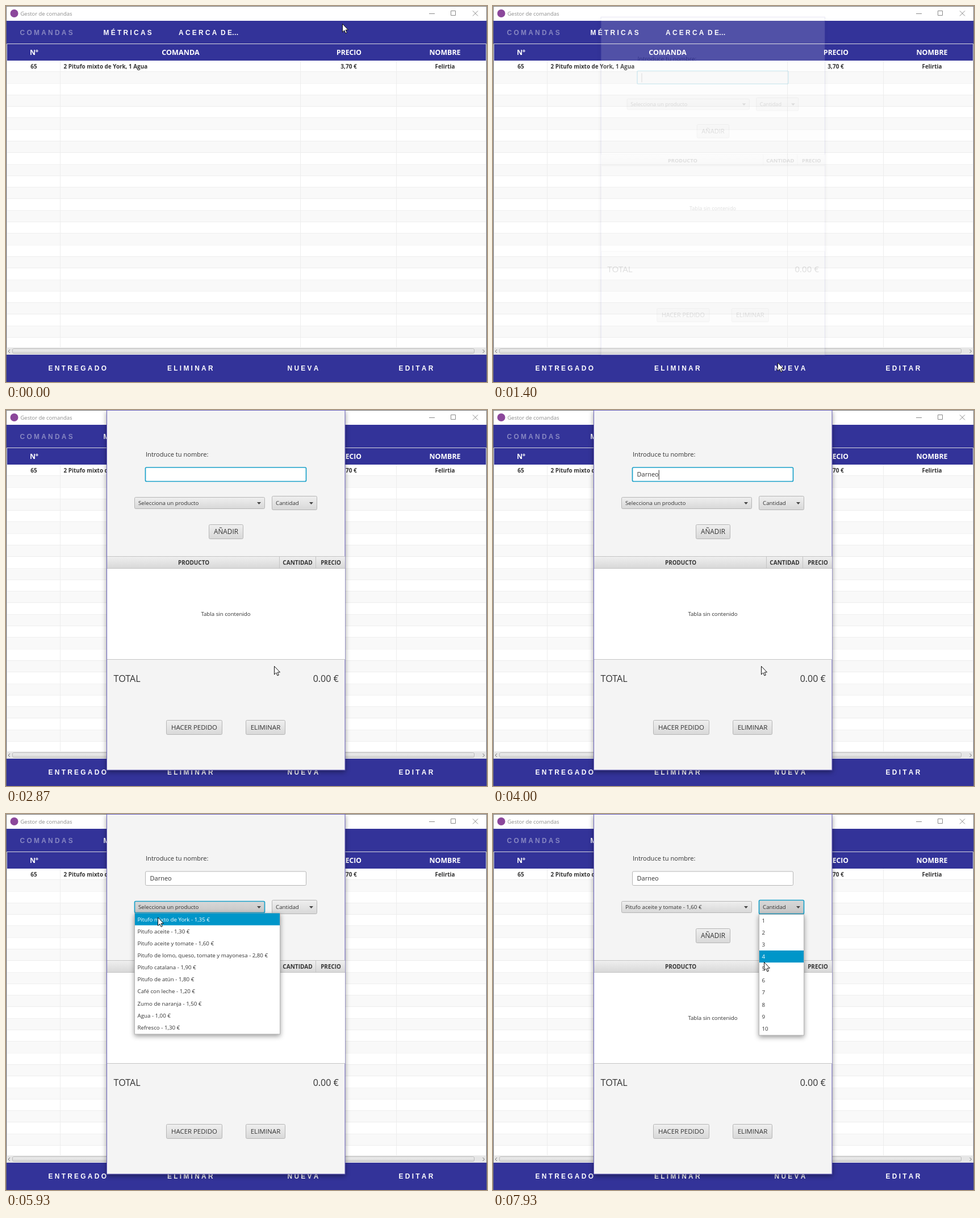
An HTML page for the animation above (8000 ms loop, 847x661 px).

```html
<!DOCTYPE html>
<html lang="es">
<head>
<meta charset="utf-8">
<title>Gestor de comandas</title>
<style>
html, body { margin: 0; width: 100%; height: 100%; overflow: hidden; background: #fff; }
svg { display: block; }
text { font-family: "Open Sans", "Noto Sans", sans-serif; fill: #333; white-space: pre; }
.bar { font: bold 11.9px "Liberation Sans", Arial, sans-serif; fill: #fff; font-kerning: none; }
.bold { font-weight: 700; }
.white { fill: #fff; }
.shadow { filter: drop-shadow(0 3px 4px #0006); }
</style>
</head>
<body>
<svg id="stage" width="847" height="661" viewBox="0 0 847 661">
  <defs>
    <linearGradient id="face" x2="0" y2="1"><stop stop-color="#efefef"/><stop offset="1" stop-color="#d8d8d8"/></linearGradient>
    <linearGradient id="hover" x2="0" y2="1"><stop stop-color="#fafafa"/><stop offset="1" stop-color="#e6e6e6"/></linearGradient>
    <linearGradient id="pressed" x2="0" y2="1"><stop stop-color="#d8d8d8"/><stop offset="1" stop-color="#c6c6c6"/></linearGradient>
  </defs>
</svg>
<script>
const BLUE = '#333399', FOCUS = '#1ba1c9', LINE = '#ededed', ROW = 21.15;
const PRODUCTS = [
  'Pitufo mixto de York - 1,35 €', 'Pitufo aceite - 1,30 €', 'Pitufo aceite y tomate - 1,60 €',
  'Pitufo de lomo, queso, tomate y mayonesa - 2,80 €', 'Pitufo catalana - 1,90 €', 'Pitufo de atún - 1,80 €',
  'Café con leche - 1,20 €', 'Zumo de naranja - 1,50 €', 'Agua - 1,00 €', 'Refresco - 1,30 €'];
const QUANTITIES = Array.from({ length: 10 }, (_, i) => `${i + 1}`);
const NAME = 'Darneo';
const TYPED_AT = [3320, 3520, 3590, 3720, 3860, 3990];
const CARET_OFF = [[1860, 2390], [2860, 2920], [4520, 5025], [5520, 8000]];

const rect = (x, y, w, h, fill, extra = '') =>
  `<rect x="${x}" y="${y}" width="${w}" height="${h}" fill="${fill}" ${extra}/>`;
const path = (d, stroke, extra = '') => `<path d="${d}" fill="none" stroke="${stroke}" ${extra}/>`;
// Text centred vertically on its capitals
const text = (x, y, size, s, cls = '', anchor = 'start', extra = '') =>
  `<text x="${x}" y="${y + size * .357}" font-size="${size}" class="${cls}" text-anchor="${anchor}" ${extra}>${s}</text>`;
const spaced = s => [...s].join(' ').replace(' …', '…').replace('   ', '  ');
const barText = (x, y, s, extra) => text(x, y, 11.9, spaced(s), 'bar', 'start', extra);
const box = (x, y, w, h, id = '', fill = 'url(#face)') =>
  rect(x + .5, y + .5, w - 1, h - 1, fill, `stroke="#b5b5b5" rx="2" id="${id}"`);
const button = (x, y, w, size, s) => box(x, y, w, 26) + text(x + w / 2, y + 13, size, s, '', 'middle');
const combo = (id, x, y, w, h, s) => box(x, y, w, h, id) +
  text(x + 7, y + h / 2, 9.75, s, '', 'start', `id="${id}Text"`) +
  `<path d="M${x + w - 14} ${y + h / 2 - 1.5}h7l-3.5 4z" fill="#444"/>`;
const popup = (id, x, y, w, items) => `<g id="${id}">` +
  rect(x + .5, y + .5, w - 1, 212.5, '#fff', 'stroke="#b5b5b5" class="shadow"') +
  rect(x + 1, y, w - 2, ROW, '#0096c9', `id="${id}Row"`) +
  items.map((s, i) => text(x + 5.5, y + .5 + ROW * (i + .5), 9.75, s)).join('') + '</g>';

function windowMarkup() {
  let s = rect(0, 0, 847, 661, '#fff') +
    '<circle cx="14.5" cy="13" r="7" fill="#8b479b"/>' +
    text(25.5, 13.5, 9.45, 'Gestor de comandas', '', 'start', 'style="fill:#8c8c8c"') +
    path('M745 13.5h10M783.5 8.5h8v8h-8zM822 8.500l9 9m0-9l-9 9', '#8a8a8a') +
    rect(0, 26, 847, 70, BLUE) +
    barText(24.5, 46.5, 'COMANDAS', 'style="fill:#8787c2"') +
    barText(171.5, 46.5, 'MÉTRICAS') + barText(304, 46.5, 'ACERCA DE…');
  for (let i = 0; i < 25; i++) {
    const y = 96 + i * 20.29, h = Math.min(20.29, 601 - y);
    s += rect(1, y, 845, h, i % 2 ? '#f9f9f9' : '#fff') + rect(1, Math.round(y + h) - 1, 845, 1, LINE);
  }
  for (const x of [95, 518, 687]) s += rect(x, 96, 1, 505, LINE);
  s += path('M1.500 601V66.500H845.500V601', '#d8d8e0');
  [[49.5, 'Nº', 12.4], [307.5, 'COMANDA', 12.6], [604, 'PRECIO', 12.2], [773, 'NOMBRE', 12.4]]
    .forEach(([x, label, size]) => s += text(x, 81.5, size, label, 'bold white', 'middle'));
  s += text(49, 106, 10, '65', 'bold', 'middle') +
    text(101.5, 106, 9.9, '2 Pitufo mixto de York, 1 Agua', 'bold') +
    text(603.5, 106, 10.1, '3,70 €', 'bold', 'middle') + text(773, 106, 9.9, 'Felirtia', 'bold', 'middle') +
    rect(1, 601, 845, 12, '#e6e6e6') + rect(11.5, 602.5, 813, 8, 'url(#face)', 'stroke="#b9b9b9" rx="2"') +
    path('M7 604l-3 3 3 3M839.500 604l3 3-3 3', '#777') +
    rect(0, 613, 847, 48, BLUE) + rect(453, 613, 140, 48, '#ff00cc', 'id="pink" rx="2"') +
    barText(74.5, 636.5, 'ENTREGADO') + barText(284, 636.5, 'ELIMINAR') +
    barText(495.5, 636.5, 'NUEVA') + barText(691.5, 636.5, 'EDITAR') +
    path('M.5 661V.5H846.500V661', '#70706f');
  return s;
}

function dialogMarkup() {
  return '<g id="dialog">' +
    rect(177.5, .5, 419.5, 632.5, '#f4f4f4', 'stroke="#6a63bd" class="shadow"') +
    text(246, 78.5, 11.1, 'Introduce tu nombre:') +
    rect(245.5, 101, 283, 24.5, '#fff', 'id="field" rx="2"') +
    text(253.5, 113.5, 11, '', '', 'start', 'id="name"') + rect(254, 105.500, 1, 17, '#333', 'id="caret"') +
    combo('product', 226, 153, 230, 21, 'Selecciona un producto') +
    combo('quantity', 468, 151, 80, 25, 'Cantidad') +
    button(357, 201, 61, 11.8, 'AÑADIR') +
    rect(178, 258, 419, 180.5, '#fff') + rect(178, 258, 419, 20, 'url(#face)') +
    path('M178 257.500H597M178 278.500H597M178 438.500H597', '#c4c4c4') +
    path('M481.500 258v20M545.500 258v20', '#c4c4c4') +
    text(330.5, 268.5, 9.9, 'PRODUCTO', 'bold', 'middle') + text(513.5, 268.5, 10.1, 'CANTIDAD', 'bold', 'middle') +
    text(572, 268.5, 9.9, 'PRECIO', 'bold', 'middle') +
    text(387, 358.5, 9.7, 'Tabla sin contenido', '', 'middle') +
    text(189.5, 472, 16.2, 'TOTAL') + text(586, 472, 16, '0.00 €', '', 'end') +
    button(282, 545, 99, 11.4, 'HACER PEDIDO') + button(422, 545, 70, 11.6, 'ELIMINAR') +
    popup('productList', 226, 174, 257, PRODUCTS) + popup('quantityList', 468, 176, 80, QUANTITIES) + '</g>';
}

const stage = document.getElementById('stage');
stage.innerHTML += windowMarkup() + dialogMarkup() +
  '<g id="cursor" fill="#fff" stroke="#111" stroke-linejoin="round">' +
  '<path id="arrow" d="M.5.5V15L3.800 11.800 6 17 8.300 16 6.100 11H10.500Z"/>' +
  '<path id="hand" d="M-1.500 1.200Q0-.8 1.500 1.200V6Q3 5 4 6.600 5.500 5.600 6.600 7.200 8.500 6.400 9 8.500V12.500Q9 15 7.300 17V19H-1V17.300L-5 11.500Q-4.800 9-1.500 11.500Z"/></g>';

const ui = {};
stage.querySelectorAll('[id]').forEach(e => ui[e.id] = e);
const show = (e, on) => e.setAttribute('display', on ? 'inline' : 'none');
const set = (e, attrs) => Object.entries(attrs).forEach(([k, v]) => e.setAttribute(k, v));

// Pointer stops: time, x, y
const STOPS = [
  [0, 592, 31], [70, 592, 31], [200, 575, 120], [400, 520, 280], [600, 463, 440], [750, 452, 545], [870, 478, 607],
  [940, 495, 622], [1070, 501, 627], [1860, 501, 626], [1930, 504, 615], [2070, 492, 530], [2200, 472, 450],
  [4670, 472, 450], [4800, 486, 415], [4930, 476, 300], [5070, 457, 200], [5200, 380, 178], [5400, 240, 167],
  [5530, 250, 167], [5810, 250, 167], [6130, 295, 205], [6330, 310, 222], [6410, 310, 222], [6600, 430, 185],
  [6730, 498, 163], [6870, 507, 151], [7010, 507, 151], [7130, 495, 152], [7270, 481, 158], [7430, 481, 158],
  [7600, 480, 185], [7930, 477, 260], [8000, 477, 262]];

function pointerAt(t) {
  const i = STOPS.findIndex(s => s[0] > t), [t0, x0, y0] = STOPS[i - 1], [t1, x1, y1] = STOPS[i];
  const p = (t - t0) / (t1 - t0);
  return [x0 + (x1 - x0) * p, y0 + (y1 - y0) * p];
}

function drawList(list, open, top, y) {
  show(list, open);
  const row = Math.floor((y - top - .5) / ROW), labels = list.querySelectorAll('text');
  show(ui[list.id + 'Row'], open && row >= 0);
  ui[list.id + 'Row'].setAttribute('y', top + .5 + Math.max(0, row) * ROW);
  labels.forEach((label, i) => label.style.fill = i === row ? '#fff' : '#333');
}

const border = (e, focused) => set(e, { stroke: focused ? FOCUS : '#b5b5b5', 'stroke-width': focused ? 1.7 : 1 });

function draw(t) {
  const [x, y] = pointerAt(t);
  const inside = (l, top, r, b) => x >= l && x < r && y >= top && y < b;
  const opened = t >= 1365;
  const onNew = !opened && inside(453, 613, 593, 661);
  const onProduct = opened && inside(226, 153, 456, 174);
  const onQuantity = opened && inside(468, 151, 548, 176);
  const productOpen = t >= 5660 && t < 6460, quantityOpen = t >= 7460;

  show(ui.pink, onNew);
  const left = 1 - Math.min(1, Math.max(0, (t - 1365) / 230));
  const scale = 1 - .1 * left ** 3;
  show(ui.dialog, opened);
  set(ui.dialog, {
    opacity: 1 - 1.5 * left ** 2 * (left < .8) - left * (left >= .8),
    transform: `translate(387 317) scale(${scale}) translate(-387 -317)`
  });

  ui.name.textContent = NAME.slice(0, TYPED_AT.filter(at => t >= at).length);
  ui.caret.setAttribute('x', 253.5 + (opened ? ui.name.getComputedTextLength() : 0));
  show(ui.caret, !CARET_OFF.some(([a, b]) => t >= a && t < b));

  border(ui.field, t < 5660);
  border(ui.product, t >= 5660 && !quantityOpen);
  border(ui.quantity, quantityOpen);
  ui.product.setAttribute('fill', `url(#${productOpen ? 'pressed' : onProduct ? 'hover' : 'face'})`);
  ui.quantity.setAttribute('fill', `url(#${quantityOpen ? 'pressed' : onQuantity ? 'hover' : 'face'})`);
  ui.productText.textContent = t >= 6460 ? PRODUCTS[2] : 'Selecciona un producto';
  drawList(ui.productList, productOpen, 174, y);
  drawList(ui.quantityList, quantityOpen, 176, y);

  const hand = onNew || onProduct || onQuantity;
  show(ui.hand, hand);
  show(ui.arrow, !hand);
  ui.cursor.setAttribute('transform', `translate(${x} ${y})`);
}

function tick() {
  draw(performance.now() % 8000);
  requestAnimationFrame(tick);
}
tick();
</script>
</body>
</html>
```
